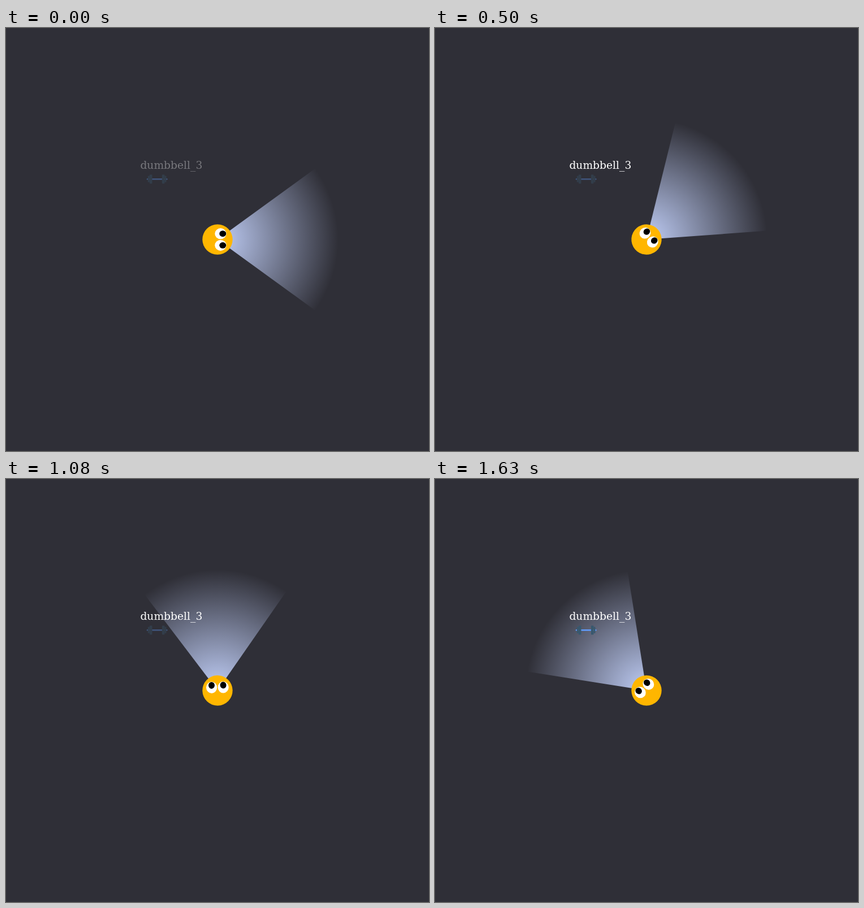
These frames come from a looping animation (748x748 px, 2000 ms). An HTML page:

```html
<!DOCTYPE html>
<html lang="en">
<head>
<meta charset="utf-8">
<title>Searching</title>
<style>
  html, body { margin: 0; width: 100%; height: 100%; overflow: hidden; background: #2f2f37; }
  svg { display: block; width: 100vw; height: 100vh; }
  text { font: 18.7px "DejaVu Serif", serif; fill: #fff; }
</style>
</head>
<body>
<svg viewBox="0 0 748 748">
  <defs>
    <radialGradient id="beam" gradientUnits="userSpaceOnUse" cx="0" cy="0" r="213.7">
      <stop offset="0" stop-color="#c0cef7"/>
      <stop offset="1" stop-color="#c0cef7" stop-opacity="0"/>
    </radialGradient>
    <g id="eye">
      <ellipse rx="10.2" ry="9.6" fill="#fff"/>
      <ellipse cx="3.8" rx="6" ry="5.5"/>
    </g>
    <g id="weight">
      <rect x="8.7" y="-8" width="4.6" height="16" rx="1"/>
      <rect x="13.3" y="-5.6" width="3" height="11.2" rx="1"/>
    </g>
  </defs>
  <g transform="translate(374 374)">
    <g id="agent">
      <path id="cone" fill="url(#beam)"/>
      <circle r="26.7" fill="#ffb600"/>
      <use href="#eye" x="5.5" y="-10.3"/>
      <use href="#eye" x="5.5" y="10.3"/>
    </g>
  </g>
  <g id="dumbbell" transform="translate(267.2 267.2)">
    <rect x="-18.4" y="-1.3" width="36.8" height="2.6" rx="1.3" fill="#619dff"/>
    <g fill="#38586e">
      <use href="#weight"/>
      <use href="#weight" transform="scale(-1 1)"/>
    </g>
  </g>
  <text id="label" x="237.4" y="249.3">dumbbell_3</text>
</svg>
<script>
  const LOOP = 2000, FPS = 24;
  const DIM = 0.35;
  const TURN = 135, TURN_STEPS = 37;
  const SEEN = 28, FOUND = 39;

  const $ = id => document.getElementById(id);
  const agent = $('agent'), dumbbell = $('dumbbell'), label = $('label');

  const half = Math.PI / 5, reach = 213.7;
  const ex = reach * Math.cos(half), ey = reach * Math.sin(half);
  $('cone').setAttribute('d', `M0 0L${ex} ${-ey}A${reach} ${reach} 0 0 1 ${ex} ${ey}Z`);

  const clamp = v => Math.min(1, Math.max(0, v));

  // Steps start at multiples of 1/24 s, rounded to 10 ms.
  function stepAt(t) {
    const k = Math.floor((t + 5) * FPS / 1000);
    return Math.round(k * 100 / FPS) * 10 > t ? k - 1 : k;
  }

  function draw(now) {
    const k = stepAt(now % LOOP);
    const awake = k >= 3;
    const angle = awake ? TURN * clamp((k - 1) / TURN_STEPS) : 0;
    agent.setAttribute('transform', `rotate(${-angle})`);
    label.setAttribute('opacity', awake ? 1 : DIM);
    dumbbell.setAttribute('opacity', DIM + (1 - DIM) * clamp((k - SEEN) / (FOUND - SEEN)));
  }

  function tick() {
    draw(performance.now());
    requestAnimationFrame(tick);
  }
  tick();
</script>
</body>
</html>
```
